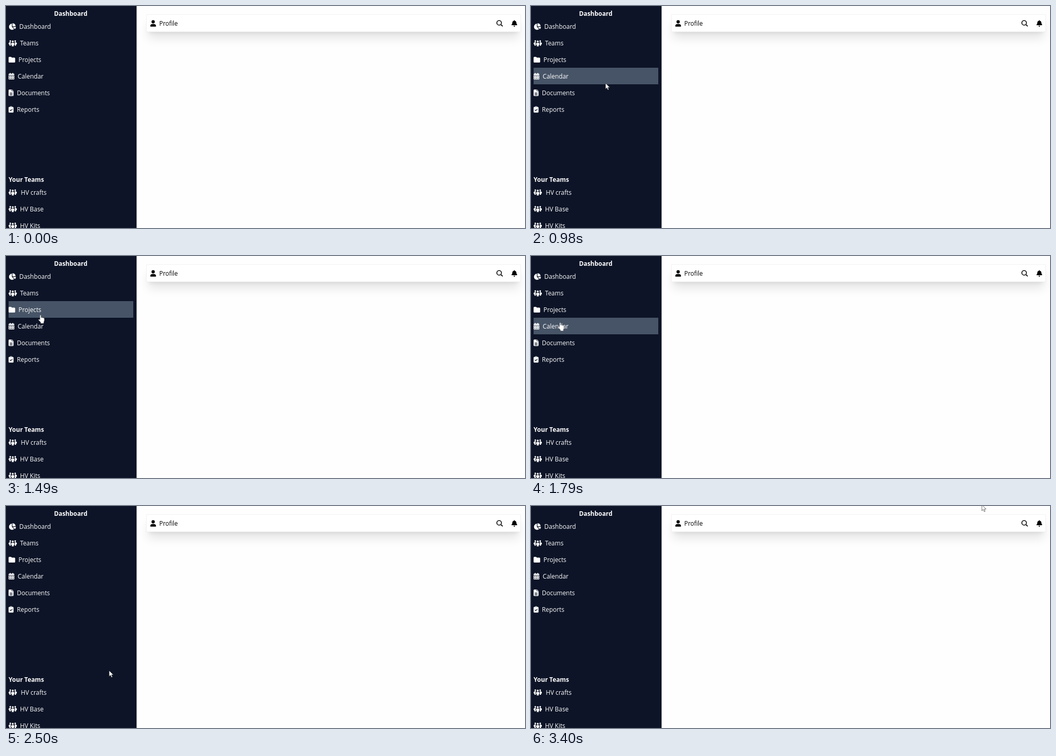
Animation of 999 by 428 pixels, one loop 4490 ms. Source, as an HTML page:

```html
<!DOCTYPE html>
<html lang="en">
<head>
<meta charset="utf-8">
<title>Dashboard</title>
<style>
  html, body { margin: 0; width: 100%; height: 100%; overflow: hidden; background: #fefefe; }
  .sidebar { position: absolute; left: 0; top: 0; width: 251px; height: 428px; background: #0d1427; border-right: 1px solid #a4a6ac; box-sizing: content-box; }
  .header {
    position: absolute; left: 270px; top: 16px; width: 721px; height: 34px; box-sizing: border-box;
    background: #fff; border: 1px solid #f2f2f2;
    box-shadow: 0 16px 20px -4px rgba(0,0,0,.1), 0 6px 8px -5px rgba(0,0,0,.1);
  }
  svg { position: absolute; left: 0; top: 0; }
  text { font: 11.85px "Open Sans", "Noto Sans", sans-serif; }
  .bold { font-weight: 700; }
  .light { fill: #fff; }
  .dark { fill: #000; }
  .icon { fill-rule: evenodd; }
</style>
</head>
<body>
<div class="sidebar"></div>
<div class="header"></div>
<svg id="stage" width="999" height="428" viewBox="0 0 999 428">
  <rect id="hover" x="5" width="240" height="32" fill="#475467"/>
  <g id="content"></g>
  <g id="cursor" fill="#fff" stroke="#333" stroke-width=".7" stroke-linejoin="round">
    <path id="arrow" d="M.4 .4V11.6L3 9.2L4.9 13.4L6.7 12.6L4.9 8.5H8.5Z"/>
    <path id="hand" stroke-width=".5" d="M0 1.2Q1.2-.5 2.3 1.2V5.2L3.5 4.8L4.4 5.5L5.6 5.2L6.4 6L7.5 5.8Q8.6 6 8.6 7.2V11L7.5 14V16.5H1.5V14.4L-2.7 9.8Q-2.8 8.2-1.2 8.5L0 9.5Z"/>
  </g>
</svg>
<script>
const icons = {
  pie: "M.8 6.7A5.9 5.9 0 0 1 6.3 .85V7.1L10.5 11.3A5.9 5.9 0 0 1 .8 6.7ZM7.5 5.9V0A5.6 5.6 0 0 1 13.4 5.9ZM7.9 7.1H14.2A6 6 0 0 1 12.1 11.3Z",
  group: "M1.7 1.6a1.55 1.55 0 1 0 3.1 0a1.55 1.55 0 1 0-3.1 0ZM11.2 1.6a1.55 1.55 0 1 0 3.1 0a1.55 1.55 0 1 0-3.1 0ZM6.2 2.4a1.8 1.8 0 1 0 3.6 0a1.8 1.8 0 1 0-3.6 0Z" +
    "M0 6.5A2.9 2.9 0 0 1 4.6 4.2Q3.2 6.2 4.1 8.3V10.6H1.7V8.6Q0 8 0 6.5ZM16 6.5A2.9 2.9 0 0 0 11.4 4.2Q12.8 6.2 11.9 8.3V10.6H14.3V8.6Q16 8 16 6.5Z" +
    "M4.8 7.4a3.2 2.7 0 0 1 6.4 0q0 1.3-1.4 2V11.8H6.2V9.4q-1.4-.7-1.4-2Z",
  folder: "M1.6 0H4.6L6.4 1.6H11Q12.6 1.6 12.6 3.2V9.5Q12.6 11 11 11H1.6Q0 11 0 9.5V1.6Q0 0 1.6 0Z",
  calendar: "M2.4 0H3.8V1.6H7.3V0H8.7V1.6H9.8Q11 1.6 11 2.8V3.9H0V2.8Q0 1.6 1.2 1.6H2.4ZM0 4.7H11V11.4Q11 12.6 9.8 12.6H1.2Q0 12.6 0 11.4Z" +
    "M1.3 6V7.4H3.1V6ZM4.5 6V7.4H6.5V6ZM7.9 6V7.4H9.7V6ZM1.3 9.6V11H3.1V9.6ZM4.5 9.6V11H6.5V9.6ZM7.9 9.6V11H9.7V9.6Z",
  file: "M1.5 0H5.6V3.2H9.5V11.1Q9.5 12.6 8 12.6H1.5Q0 12.6 0 11.1V1.5Q0 0 1.5 0ZM6.4 0L9.5 2.5H6.4ZM2.2 6V6.9H7.3V6ZM2.2 8V8.9H7.3V8ZM2.2 10V10.9H7.3V10Z",
  clipboard: "M1.5 1.6H2.7Q3.2 0 4.75 0T6.8 1.6H8Q9.5 1.6 9.5 3.1V11.1Q9.5 12.6 8 12.6H1.5Q0 12.6 0 11.1V3.1Q0 1.6 1.5 1.6ZM4.1 2.1H5.4V1.1H4.1ZM2 7.6L4.2 9.8L7.8 6L6.9 5.2L4.2 8L2.9 6.7Z",
  user: "M2.4 3.2a3.15 3.15 0 1 0 6.3 0a3.15 3.15 0 1 0-6.3 0ZM0 11.8Q0 7.5 4.4 7.5H6.7Q11.1 7.5 11.1 11.8Q11.1 12.6 10.3 12.6H.8Q0 12.6 0 11.8Z",
  search: "M0 5.2a5.2 5.2 0 1 0 10.4 0a5.2 5.2 0 1 0-10.4 0ZM1.6 5.2a3.6 3.6 0 1 1 7.2 0a3.6 3.6 0 1 1-7.2 0ZM8 9.2L9.2 8L12.6 11.4L11.4 12.6Z",
  bell: "M4.7 .8Q5.5-.6 6.3 .8V1.2Q9.4 1.9 9.4 5Q9.4 7.5 10.8 8.6Q11.4 9.6 10.4 9.8H.6Q-.4 9.6 .2 8.6Q1.6 7.5 1.6 5Q1.6 1.9 4.7 1.2ZM3.9 10.7H7.1Q7 12.5 5.5 12.6Q4 12.5 3.9 10.7Z"
};

const rowHeight = 32;
// label, icon, text x, row top, icon offset in the row
const rows = [
  ["Dashboard", "pie", 25.5, 23, 10.2],
  ["Teams", "group", 27, 55, 11],
  ["Projects", "folder", 24, 87, 11],
  ["Calendar", "calendar", 22.5, 119, 10],
  ["Documents", "file", 21, 151, 10],
  ["Reports", "clipboard", 21, 183, 10],
  ["HV crafts", "group", 28.5, 343, 10.5],
  ["HV Base", "group", 27, 375, 10.5],
  ["HV Kits", "group", 27, 407, 10.5]
];

const byId = id => document.getElementById(id);
const label = (text, x, y, style) => `<text x="${x}" y="${y}" class="${style}">${text}</text>`;
const icon = (name, x, y, style) =>
  `<path class="icon ${style}" transform="translate(${x} ${y})" d="${icons[name]}"/>`;

byId("content").innerHTML =
  label("Dashboard", 92.5, 18.5, "light bold") +
  label("Your Teams", 5, 338.5, "light bold") +
  rows.map(([text, name, x, top, dy]) =>
    icon(name, 5, top + dy, "light") + label(text, x, top + 21, "light")).join("") +
  icon("user", 277.7, 27.2, "dark") + label("Profile", 295, 38, "dark") +
  icon("search", 944, 27.2, "dark") + icon("bell", 973, 27.2, "dark");

const loop = 4490, enterTime = 680, stepTime = 100.7, lastStep = 27;
const smooth = u => u * u * (3 - 2 * u);
const easeOut = u => 1 - (1 - u) ** 2;
// step, x, y, easing towards this point
const route = [
  [0, 497.5, 408],
  [5, 75.5, 99, easeOut],
  [11, 55, 128, smooth],
  [16, 69, 298, smooth],
  [21, 436, 352, smooth],
  [lastStep, 867.5, -2.5, smooth]
];

function pointerAt(step) {
  const i = Math.max(1, route.findIndex(point => point[0] >= step));
  const [s0, x0, y0] = route[i - 1], [s1, x1, y1, ease] = route[i];
  const u = ease((step - s0) / (s1 - s0));
  return [x0 + (x1 - x0) * u, y0 + (y1 - y0) * u];
}

const show = (id, visible) => byId(id).setAttribute("visibility", visible ? "visible" : "hidden");

function draw(now) {
  const t = now % loop;
  const inside = t >= enterTime;
  // The pointer is sampled about ten times a second.
  const step = Math.min(lastStep, Math.max(0, Math.floor((t - enterTime) / stepTime + .13)));
  const [x, y] = pointerAt(step);
  const row = inside && x >= 5 && x < 245 &&
    rows.find(([, , , top]) => y >= top && y < top + rowHeight);
  const pointing = Boolean(row) && step > 5;

  show("hover", row);
  if (row) byId("hover").setAttribute("y", row[3]);
  show("arrow", inside && !pointing);
  show("hand", inside && pointing);
  byId("cursor").setAttribute("transform", `translate(${x} ${y})`);
}

const start = performance.now();
function tick() {
  draw(performance.now() - start);
  requestAnimationFrame(tick);
}
tick();
</script>
</body>
</html>
```
